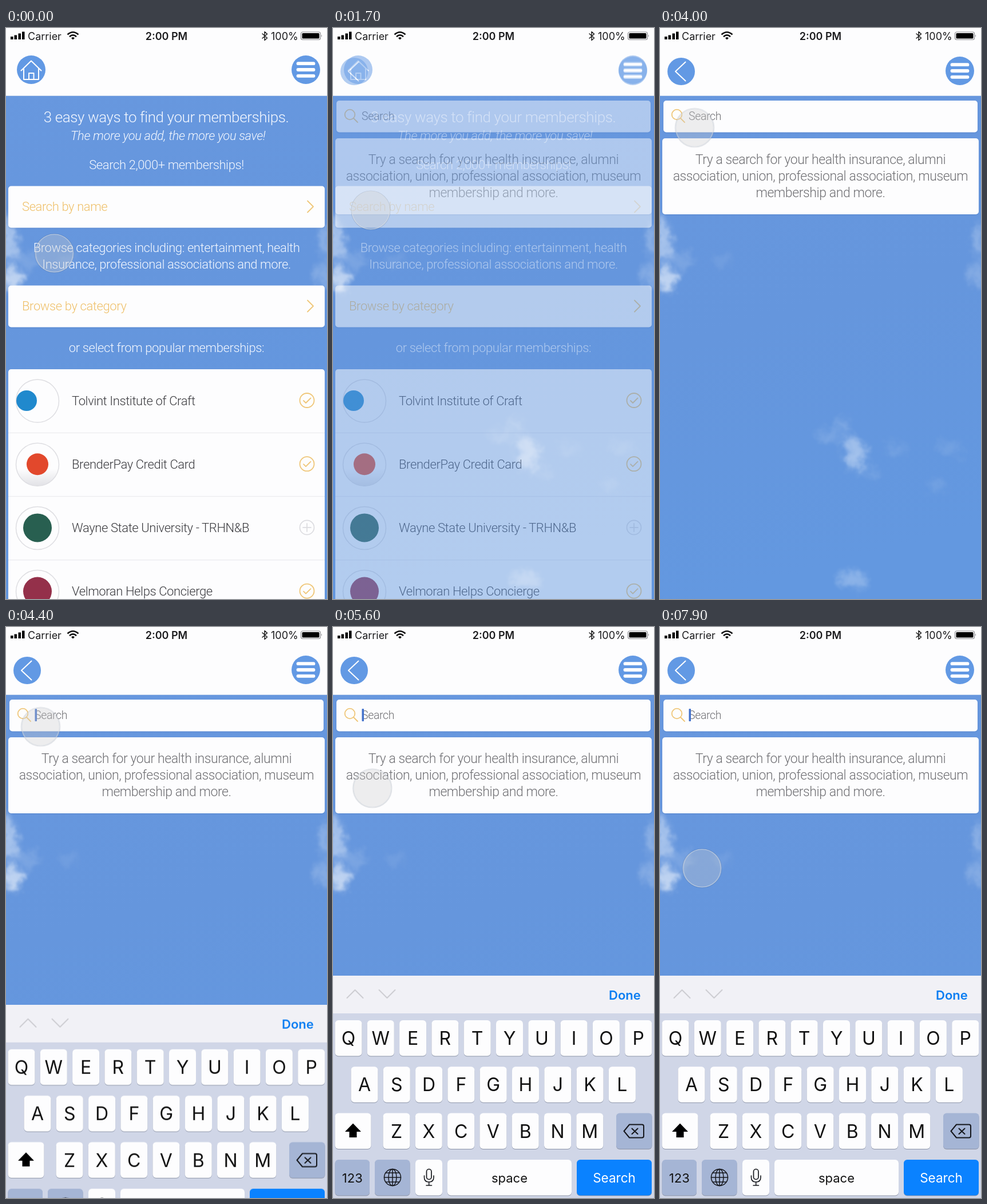
An HTML page that plays this animation: 561x999 px, repeating every 8000 ms.

```html
<!DOCTYPE html>
<html lang="en">
<head>
<meta charset="utf-8">
<title>Membership search</title>
<style>
html, body { margin: 0; width: 100%; height: 100%; overflow: hidden; background: #6698df; }
svg.stage { display: block; width: 100vw; height: 100vh; font-family: Inter, "Open Sans", sans-serif; }
.light { font: 300 22px Roboto, "Liberation Sans", sans-serif; letter-spacing: -.018em; }
.mid { text-anchor: middle; }
.white { fill: #f4f8ff; }
.gold { fill: #efc069; }
.grey { fill: #6f6f73; }
.dark { fill: #3c3c40; }
.card { fill: #fdfdfe; filter: drop-shadow(0 1px 1px rgba(40, 80, 150, .2)); }
.line { fill: none; stroke-linecap: round; stroke-linejoin: round; }
.goldline { stroke: #efc678; stroke-width: 1.8; }
.key { filter: drop-shadow(0 1.5px 0 #8d95a8); }

.home, .find, .touch, .keyboard, .focus { animation: 8s linear infinite; }
.home { animation-name: leave; }
.find { animation-name: enter; }
.touch { animation-name: touch; animation-timing-function: ease-in-out; }
.keyboard { animation-name: rise; }
.focus { animation-name: focus; }
.caret { animation: blink 1s linear infinite; }

@keyframes leave { 0%, 20.2% { opacity: 1; } 22.4%, 100% { opacity: 0; } }
@keyframes enter { 0%, 20.2% { opacity: 0; } 22.4%, 100% { opacity: 1; } }
@keyframes touch {
  0% { transform: translate(84.5px, 394px); }
  18.5%, 37% { transform: translate(66px, 319px); }
  49%, 61% { transform: translate(60.5px, 174.5px); }
  78% { transform: translate(75.5px, 369.5px); }
  98%, 100% { transform: translate(73.5px, 422px); }
}
@keyframes rise {
  0%, 52.5% { transform: translateY(392px); animation-timing-function: cubic-bezier(.38, .7, .125, 1); }
  58.75%, 100% { transform: none; }
}
@keyframes focus { 0%, 52.4% { opacity: 0; } 52.5%, 100% { opacity: 1; } }
@keyframes blink { 0%, 32% { opacity: 0; } 36%, 94% { opacity: 1; } 98%, 100% { opacity: 0; } }
</style>
</head>
<body>
<svg class="stage" viewBox="0 0 561 999" preserveAspectRatio="none">
  <defs>
    <linearGradient id="sky" x1="0" y1="0" x2=".15" y2="1">
      <stop offset="0" stop-color="#6898df"/>
      <stop offset=".55" stop-color="#6596dd"/>
      <stop offset="1" stop-color="#6398e0"/>
    </linearGradient>
    <linearGradient id="shade" x1="0" y1="0" x2="0" y2="1">
      <stop offset=".6" stop-color="#fdfdfe"/>
      <stop offset="1" stop-color="#e2e2e6"/>
    </linearGradient>
    <filter id="wisp" x="-10%" y="-10%" width="120%" height="120%">
      <feGaussianBlur stdDeviation="7" result="blur"/>
      <feTurbulence type="fractalNoise" baseFrequency=".04" numOctaves="3" seed="4"/>
      <feDisplacementMap in="blur" scale="32" xChannelSelector="R" yChannelSelector="G"/>
    </filter>
    <g id="menu">
      <circle r="25" fill="#6299e4"/>
      <path class="line" d="M-13.500-10.800h27M-13.500 0h27M-13.500 10.800h27" stroke="#fff" stroke-width="5.800"/>
    </g>
    <path id="next" class="line goldline" d="M-5-10L5 0L-5 10"/>
    <g id="tick" class="line goldline">
      <circle r="12.500"/><path d="M-6 .5L-2 4.500L6.500-4"/>
    </g>
    <g id="plus" class="line" stroke="#dcdce0" stroke-width="1.700">
      <circle r="12.500"/><path d="M-7 0H7M0-7V7"/>
    </g>
  </defs>

  <rect width="561" height="999" fill="url(#sky)"/>
  <g id="clouds" fill="#fff" filter="url(#wisp)"></g>
  <rect width="561" height="118" fill="#fdfdfe"/>
  <rect y="118" width="561" height="1" fill="#cfdcf0"/>

  <g class="home">
    <circle cx="44" cy="73" r="25" fill="#6299e4"/>
    <path class="line" d="M26.500 74.500L44 57.500L61.500 74.500M31 71V90H57V71M40 90V79H48.500V90" stroke="#fff" stroke-width="2"/>
    <use href="#menu" x="524" y="73"/>
    <g class="light white mid">
      <text x="280" y="165" style="font-size:26px">3 easy ways to find your memberships.</text>
      <text x="283" y="196" font-style="italic">The more you add, the more you save!</text>
      <text x="280.500" y="247">Search 2,000+ memberships!</text>
      <text x="280.500" y="392">Browse categories including: entertainment, health</text>
      <text x="280.500" y="421">Insurance, professional associations and more.</text>
      <text x="280.500" y="567">or select from popular memberships:</text>
    </g>
    <rect class="card" x="4" y="276.500" width="553" height="73" rx="5"/>
    <rect class="card" x="4" y="450.500" width="553" height="73" rx="5"/>
    <text class="light gold" x="28" y="320">Search by name</text>
    <text class="light gold" x="28" y="494">Browse by category</text>
    <use href="#next" x="532" y="312.500"/>
    <use href="#next" x="532" y="486.500"/>
    <rect class="card" x="4" y="597" width="553" height="420" rx="5"/>
    <g id="rows"></g>
  </g>

  <g class="find">
    <circle cx="37" cy="76" r="24" fill="#6299e4"/>
    <path class="line" d="M44.500 59.500L27 76L44.500 92.500" stroke="#fff" stroke-width="2"/>
    <use href="#menu" x="524" y="75"/>
    <rect class="card" x="6" y="127" width="549" height="55.500" rx="5"/>
    <g class="line goldline"><circle cx="29.500" cy="151.500" r="8.800"/><path d="M36 158L43 165"/></g>
    <text class="light grey" x="50" y="160.500" style="font-size:19.5px">Search</text>
    <g class="focus"><rect class="caret" x="50.500" y="143" width="3.500" height="22" rx="1" fill="#4472cb"/></g>
    <rect class="card" x="4" y="193" width="553" height="133" rx="5"/>
    <g class="light grey mid" style="font-size:23px">
      <text x="280.500" y="238">Try a search for your health insurance, alumni</text>
      <text x="280.500" y="267">association, union, professional association, museum</text>
      <text x="280.500" y="296">membership and more.</text>
    </g>
  </g>

  <g font-size="18" fill="#1b1b1d">
    <path d="M8 15h4.500v5H8zM14.500 12.500H19V20h-4.500zM21.500 9.500H26V20h-4.500zM28 6.500h4.500V20H28z" fill="#000"/>
    <text x="38" y="20.500">Carrier</text>
    <g class="line" stroke="#111" stroke-width="2.600" style="stroke-linecap:butt">
      <path d="M107.500 11.500Q117 3 126.500 11.500M111 15.200Q117 9.500 123 15.200"/>
      <path d="M114 17.500Q117 14.500 120 17.500L117 20.500Z" fill="#111" stroke="none"/>
    </g>
    <text class="mid" x="280.500" y="20.500" font-weight="600">2:00 PM</text>
    <path class="line" d="M448 10L456.500 17.500L452 21.500V6.500L456.500 10.500L448 18" stroke="#111" stroke-width="1.400"/>
    <text x="463" y="20.500">100%</text>
    <rect x="515.500" y="7" width="34" height="13.500" rx="3" fill="none" stroke="#8e8e92" stroke-width="1.200"/>
    <rect x="517.500" y="9" width="30" height="9.500" rx="1.500" fill="#000"/>
    <path d="M551 11.500q2 2.200 0 4.500z" fill="#8e8e92"/>
  </g>

  <g class="keyboard">
    <rect y="610" width="561" height="392" fill="#d0d6e7"/>
    <rect y="610" width="561" height="66" fill="#f1f1f6"/>
    <path class="line" d="M24.500 649L38.500 635L52.500 649M80.500 635L94.500 649L108.500 635" stroke="#cdcdd2" stroke-width="2"/>
    <text x="482" y="651.500" font-size="22" font-weight="600" fill="#0a7df2">Done</text>
    <g id="keys" class="mid" fill="#111"></g>
    <path d="M35 868.500L49 883H41.500V893H28.500V883H21Z" fill="#000"/>
    <g class="line" stroke="#15171c" stroke-width="2">
      <path d="M518 870.500H540Q543 870.500 543 873.500V890.500Q543 893.500 540 893.500H518L508.500 882ZM522.500 877.500L532.500 887M532.500 877.500L522.500 887"/>
      <g stroke-width="1.500">
        <circle cx="104" cy="963" r="14.500"/>
        <ellipse cx="104" cy="963" rx="7" ry="14.500"/>
        <path d="M104 948.500V977.500M89.500 963H118.500M92.500 955H115.500M92.500 971H115.500"/>
      </g>
      <rect x="163.500" y="948.500" width="8.500" height="18" rx="4.250" stroke-width="1.700"/>
      <path d="M159.500 960V963Q159.500 971 167.700 971T176 963V960M167.700 971V977M163 977H172.500" stroke-width="1.600"/>
    </g>
  </g>

  <g class="touch">
    <circle r="34" fill="none" stroke="rgba(60,70,90,.16)" stroke-width="1.200"/>
    <circle r="33" fill="rgba(205,205,205,.32)" stroke="rgba(215,220,226,.85)" stroke-width="1.200"/>
  </g>
</svg>
<script>
const add = (id, tag, attrs, label) => {
  const el = document.createElementNS('http://www.w3.org/2000/svg', tag);
  for (const name in attrs) el.setAttribute(name, attrs[name]);
  if (label) el.textContent = label;
  document.getElementById(id).append(el);
};

// Wisps of cloud: x, y, rx, ry, opacity
[
  [4, 350, 10, 22, .45], [6, 385, 16, 22, .4], [10, 440, 15, 18, .6], [30, 405, 30, 14, .14],
  [110, 407, 20, 9, .09], [558, 370, 11, 30, .25], [556, 430, 12, 20, .22],
  [322, 695, 6, 12, .28], [336, 735, 17, 20, .38], [345, 762, 16, 14, .36], [295, 712, 20, 12, .14],
  [375, 782, 12, 6, .16], [410, 735, 20, 10, .1], [485, 800, 14, 9, .12], [510, 735, 18, 12, .1],
  [338, 966, 22, 18, .26]
].forEach(([cx, cy, rx, ry, opacity]) => add('clouds', 'ellipse', { cx, cy, rx, ry, opacity }));

// List rows: label, icon, badge colour, badge x, badge radius
[
  ['Tolvint Institute of Craft', 'tick', '#2089cd', 36, 18],
  ['BrenderPay Credit Card', 'tick', '#e2482c', 55, 19],
  ['Wayne State University - TRHN&B', 'plus', '#285f50', 55, 25],
  ['Velmoran Helps Concierge', 'tick', '#94304a', 55, 25]
].forEach(([label, icon, fill, cx, r], i) => {
  const y = 652 + i * 111.2;
  if (i) add('rows', 'rect', { x: 4, y: y - 55.5, width: 553, height: 1.3, fill: '#ececef' });
  add('rows', 'circle', { cx: 55, cy: y + .5, r: 37.5, fill: i === 1 ? 'url(#shade)' : '#fdfdfe', stroke: '#dedee2', 'stroke-width': 1.5 });
  add('rows', 'circle', { cx, cy: y, r, fill });
  add('rows', 'text', { class: 'light dark', x: 115, y: y + 7.5 }, label);
  add('rows', 'use', { href: '#' + icon, x: 526, y: y - .5 });
});

const key = (x, y, width, label, size = 32, fill = '#fdfdfe', ink = '#111') => {
  add('keys', 'rect', { class: 'key', x, y, width, height: 62.5, rx: 6, fill });
  if (label) add('keys', 'text', { x: x + width / 2, y: y + 31.5 + size * .365, 'font-size': size, fill: ink }, label);
};
[['QWERTYUIOP', 3.5], ['ASDFGHJKL', 31.5], ['ZXCVBNM', 87.5]].forEach(([letters, x], row) =>
  [...letters].forEach((letter, i) => key(x + i * 56.3, 688 + row * 81.3, 47, letter)));

const slate = '#a5b5d5';
key(3.5, 850.5, 63);
key(495, 850.5, 62.5, '', 0, slate);
key(3.5, 932, 60.5, '123', 22, slate);
key(73, 932, 61.5, '', 0, slate);
key(144, 932, 47);
key(200, 932, 217, 'space', 22);
key(426, 932, 131, 'Search', 22.5, '#0a82ff', '#fff');
</script>
</body>
</html>
```
